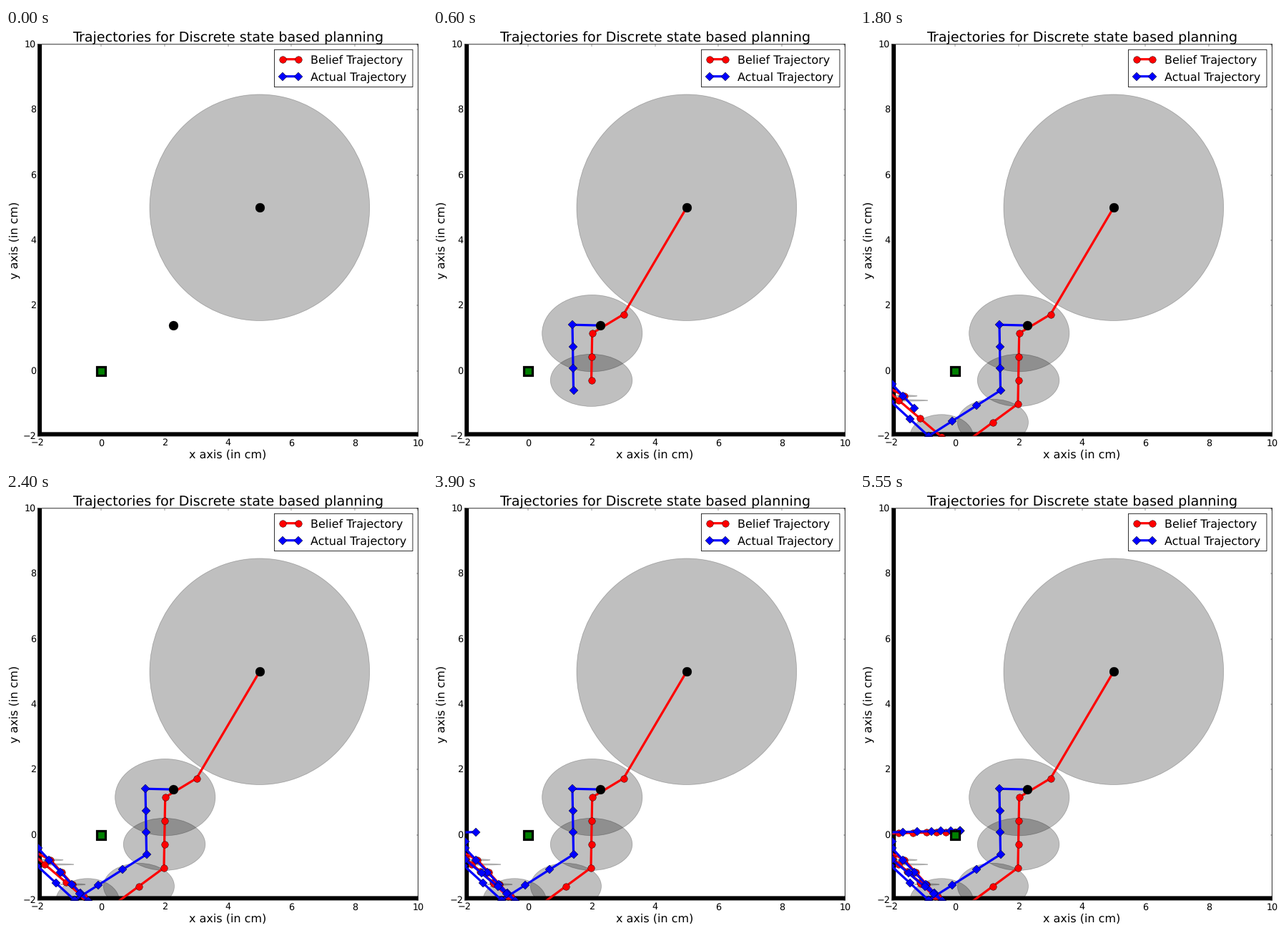
Write a matplotlib script that moves like this. It is 589 by 610 pixels and loops after 5.7 s.

```python
import matplotlib.pyplot as plt
import numpy as np
from matplotlib.animation import FuncAnimation
from matplotlib.patches import Ellipse, Rectangle

W, H, DPI = 589, 610, 100
FRAMES, STEP_MS = 38, 150
LEFT, RIGHT, TOP, BOTTOM = 44.5, 576.5, 22.8, 571
PT = 72 / DPI  # points per pixel

plt.rcParams.update({"font.family": "DejaVu Sans", "text.hinting": "none"})


def travel(*turns):
    """Positions per step, moving evenly between (step, x, y) turns."""
    step, x, y = np.array(turns).T
    t = np.arange(FRAMES)
    return np.column_stack([np.interp(t, step, x), np.interp(t, step, y)])


belief = travel(
    (0, 5, 5), (1, 3.01, 1.73), (2, 2.02, 1.15), (5, 1.98, -1.01),
    (7, 0.4, -2.14), (8, -0.43, -2.02), (11, -2.45, -0.35),
    (12, -1.6, -0.77), (16, -0.2, -2.27), (21, -2.4, -0.35),
    (24, -3.1, 0.02), (29, -0.9, 0.07), (32, 0, 0.08))
actual = travel(
    (0, 2.285, 1.39), (1, 1.395, 1.41), (4, 1.43, -0.6), (7, -0.84, -2),
    (9, -2.03, -0.94), (10, -2, -0.4), (13, -0.92, -1.52),
    (15, -0.4, -2.03), (17, -0.96, -1.59), (19, -2, -0.75), (20, -2, -0.2),
    (23, -3, 0.05), (28, -0.75, 0.11), (31, 0.15, 0.13))


def spread(i):
    """Ellipse size: shrinks as readings add up, collapses at each wall."""
    if i == 0:
        return 6.94, 6.93
    width = np.sqrt(20 / (i + 1)) if i < 6 else 0.8
    height = 1.35 + 0.25 ** (i - 1) if i < 5 else 0.05
    return width, height


def line_style(color, marker, size):
    return dict(color=color, marker=marker, ms=size * PT, lw=3.2 * PT,
                mec="black", mew=0.4 * PT)


BELIEF_STYLE = line_style("red", "o", 9.6)
ACTUAL_STYLE = line_style("blue", "D", 8.8)

fig = plt.figure(figsize=(W / DPI, H / DPI), dpi=DPI, facecolor="white")


def make_plot():
    ax = fig.add_axes([LEFT / W, 1 - BOTTOM / H,
                       (RIGHT - LEFT) / W, (BOTTOM - TOP) / H])
    ticks = range(-2, 11, 2)
    ax.set(xlim=(-2, 10), ylim=(-2, 10), xticks=ticks, yticks=ticks)
    ax.tick_params(direction="in", top=True, right=True, length=3.2 * PT,
                   width=0.4 * PT, labelbottom=False, labelleft=False)
    for spine in ax.spines.values():
        spine.set(linewidth=0.8 * PT, snap=False)
    wall = dict(color="black", lw=11.2 * PT, zorder=1.5, snap=False)
    ax.axvline(-2, **wall)
    ax.axhline(-2, **wall)
    return ax


def make_overlay():
    """Axes over the whole stage, measured in pixels from the top left."""
    ax = fig.add_axes([0, 0, 1, 1], zorder=2)
    ax.set(xlim=(0, W), ylim=(H, 0))
    ax.axis("off")
    return ax


def label(x, y, text, size, ha="center", rotation=0):
    overlay.text(x, y, text, fontsize=size * PT, ha=ha, va="baseline",
                 rotation=rotation, rotation_mode="anchor")


def draw_labels():
    label(310.3, 19.5, "Trajectories for Discrete state based planning", 19.2)
    label(310.5, 602, "x axis (in cm)", 16)
    label(16.3, 297, "y axis (in cm)", 16, rotation=90)
    for value in range(-2, 11, 2):
        text = str(value).replace("-", "\u2212")
        share = (value + 2) / 12
        label(LEFT + share * (RIGHT - LEFT), 584.5, text, 12.8)
        label(42.3, BOTTOM - share * (BOTTOM - TOP) + 4, text, 12.8, "right")


def draw_legend():
    overlay.add_patch(Rectangle((375.5, 30.3), 193.5, 52.3, fc="white",
                                ec="black", lw=0.8 * PT, snap=False))
    rows = [(43.7, "Belief Trajectory", BELIEF_STYLE),
            (67.7, "Actual Trajectory", ACTUAL_STYLE)]
    for y, text, style in rows:
        overlay.plot([387, 409], [y, y], snap=False, **style)
        label(426, y + 5.6, text, 16, "left")


plot = make_plot()
overlay = make_overlay()
draw_labels()
draw_legend()

ellipses = []
for i in range(8):
    ellipse = Ellipse(belief[2 * i], *spread(i), fc="black", ec="black",
                      alpha=0.25, lw=0.8 * PT, zorder=1)
    ellipses.append(plot.add_patch(ellipse))

belief_line, = plot.plot([], [], zorder=2.1, **BELIEF_STYLE)
actual_line, = plot.plot([], [], zorder=2.2, **ACTUAL_STYLE)
for start in (belief[0], actual[0]):
    plot.plot(*start, "o", color="black", ms=12.8 * PT, mew=0.4 * PT, zorder=3)
plot.plot(0, 0, "s", mfc="green", mec="black", ms=11.5 * PT, mew=3.2 * PT,
          zorder=3)


def update(step):
    belief_line.set_data(*belief[:step + 1].T)
    actual_line.set_data(*actual[:step + 1].T)
    for i, ellipse in enumerate(ellipses):
        ellipse.set_visible(2 * i <= step)
    return [belief_line, actual_line, *ellipses]


anim = FuncAnimation(fig, update, frames=FRAMES, interval=STEP_MS,
                     repeat=True, repeat_delay=0, blit=False)
plt.show()
```
